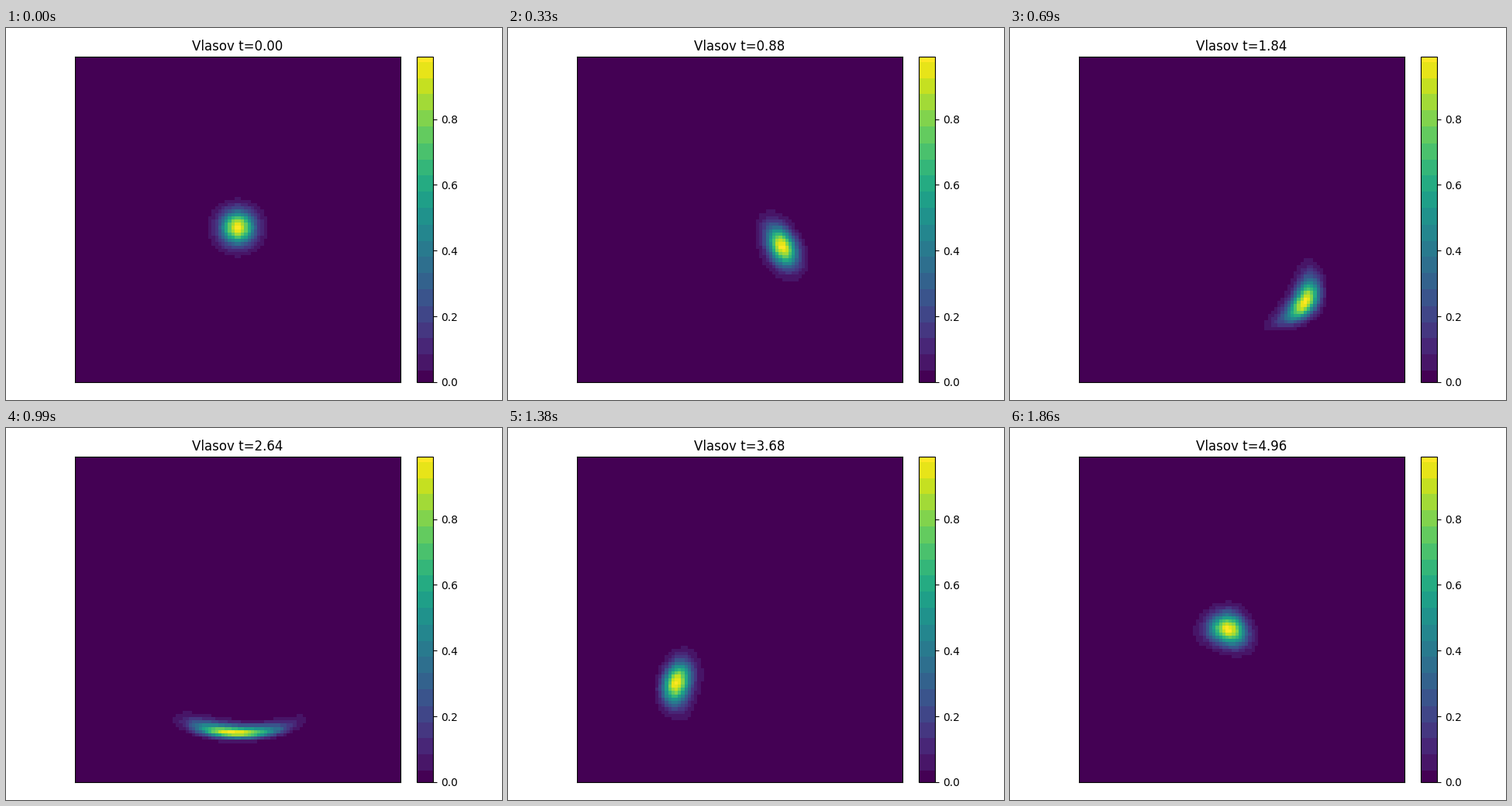
A matplotlib script for the animation above (1890 ms loop, 640 px wide and 480 px high).

```python
import numpy as np
import matplotlib.pyplot as plt
from matplotlib.animation import FuncAnimation
from matplotlib.colors import ListedColormap

W, H, DPI = 640, 480, 100
FRAMES, INTERVAL, DT, SUBSTEPS = 63, 30, 0.08, 4

# Soft spring plus an exponential wall, balanced at REST
SPRING, WALL, STEEP, REST = 0.196, 2.646, 0.55, 4.55
START = 0.5

grid = np.linspace(-10, 10, 100)
v, x = np.meshgrid(grid, grid)


def flow(state):
    pos, vel = state
    s = pos - REST
    return np.array([vel, WALL * (1 - np.exp(STEEP * s)) - SPRING * s])


def rk4(state, h):
    a = flow(state)
    b = flow(state + h / 2 * a)
    c = flow(state + h / 2 * b)
    d = flow(state + h * c)
    return state + h / 6 * (a + 2 * b + 2 * c + d)


def densities():
    """Trace every grid point back in time to the initial Gaussian."""
    state = np.array([x, v])
    out = []
    for _ in range(FRAMES):
        out.append(np.exp(-(state[0] - START)**2 - state[1]**2))
        for _ in range(SUBSTEPS):
            state = rk4(state, -DT / SUBSTEPS)
    return out


def banded_viridis(first=8.5, step=12.8):
    i = np.arange(256)
    mid = first + step * (np.floor((i - first) / step) + 0.5)
    mid[i < first] = 0
    mid[mid > 252] = 255
    return ListedColormap(plt.get_cmap("viridis")(mid / 255))


def add_axes(left, top, width, height):
    return fig.add_axes([left / W, 1 - (top + height) / H, width / W, height / H])


fig = plt.figure(figsize=(W / DPI, H / DPI), dpi=DPI, facecolor="white")
ax = add_axes(89, 37, 420, 420)
cax = add_axes(530, 37, 21, 420)

fields = densities()
im = ax.imshow(fields[0], cmap=banded_viridis(), vmin=0, vmax=fields[0].max(),
               interpolation="nearest", aspect="auto")
ax.set_xticks([])
ax.set_yticks([])
title = ax.set_title("Vlasov t=0.00")
fig.colorbar(im, cax=cax)


def update(i):
    im.set_data(fields[i])
    title.set_text(f"Vlasov t={i * DT:.2f}")
    return im, title


anim = FuncAnimation(fig, update, frames=FRAMES, interval=INTERVAL,
                     repeat=True, repeat_delay=0, blit=False)
plt.show()
```
